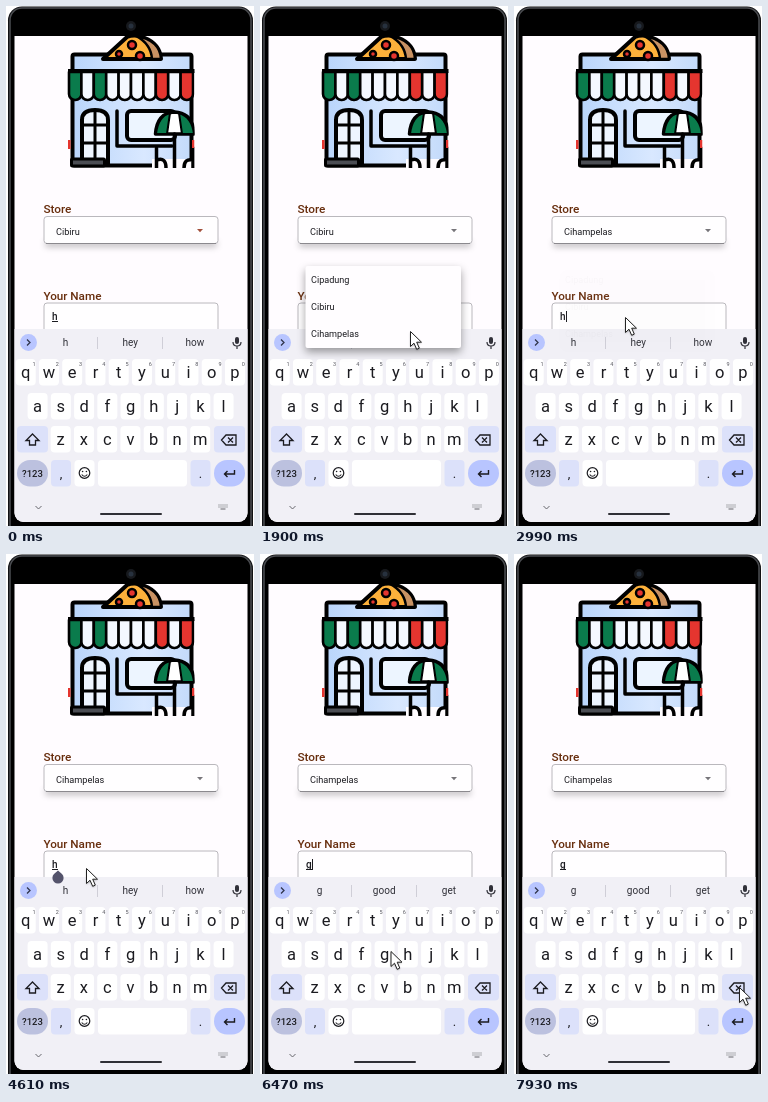
Animation of 248 by 520 pixels, one loop 8000 ms. Source, as an HTML page with a canvas:

```html
<!DOCTYPE html>
<html lang="en">
<head>
<meta charset="utf-8">
<title>Order form</title>
<style>
html, body { margin: 0; width: 100%; height: 100%; overflow: hidden; background: #fff; }
canvas { display: block; width: 248px; height: 520px; }
</style>
</head>
<body>
<canvas id="stage"></canvas>
<script>
const W = 248, H = 520, LOOP = 8000;
const canvas = document.getElementById('stage');
const dpr = window.devicePixelRatio || 1;
canvas.width = W * dpr;
canvas.height = H * dpr;
const c = canvas.getContext('2d');
const INK = '#1b1b20', PAPER = '#fffcff', BROWN = '#682e0e', EDGE = '#bab8bd';
const GREEN = '#0a7b4c', RED = '#e5352f';

// pointer: time, x, y
const path = [
  [200, 219, 520], [420, 211, 405], [700, 192, 227], [890, 189, 235], [1430, 189, 235],
  [1900, 150, 325], [2200, 146, 334], [2710, 141, 328], [2990, 111, 311], [3500, 80, 314],
  [5200, 80, 314], [5600, 127, 424], [5980, 121, 403], [6250, 121, 403], [6470, 130.5, 397],
  [6890, 137, 397], [7180, 157, 397], [7370, 157, 397], [7860, 225, 433]
];
const caretOn = [
  [350, 850], [2740, 3280], [3600, 3800], [4110, 4610], [4820, 5320],
  [5820, 6600], [7100, 7600]
];

const within = (t, a, b) => t >= a && t < b;
const clamp = v => Math.max(0, Math.min(1, v));
const seg = (t, a, b) => { const p = clamp((t - a) / (b - a)); return p * p * (3 - 2 * p); };
const mix = (a, b, p) => a + (b - a) * p;

function box(x, y, w, h, r, fill, stroke, lw = 1) {
  c.beginPath();
  c.roundRect(x, y, w, h, r);
  if (fill) { c.fillStyle = fill; c.fill(); }
  if (stroke) { c.strokeStyle = stroke; c.lineWidth = lw; c.stroke(); }
}

function disc(x, y, r, fill, stroke, lw = 1) {
  c.beginPath();
  c.arc(x, y, r, 0, 7);
  if (fill) { c.fillStyle = fill; c.fill(); }
  if (stroke) { c.strokeStyle = stroke; c.lineWidth = lw; c.stroke(); }
}

function shape(d, fill, stroke, lw = 1) {
  const p = new Path2D(d);
  if (fill) { c.fillStyle = fill; c.fill(p); }
  if (stroke) { c.strokeStyle = stroke; c.lineWidth = lw; c.stroke(p); }
}

function text(s, x, y, size, color = INK, align = 'left', weight = 400) {
  c.font = `${weight} ${size}px Roboto, sans-serif`;
  c.textAlign = align;
  c.fillStyle = color;
  c.fillText(s, x, y);
}

function shadowed(blur, dy, color, draw) {
  c.save();
  c.shadowColor = color;
  c.shadowBlur = blur * dpr;
  c.shadowOffsetY = dy * dpr;
  draw();
  c.restore();
}

function phone() {
  c.fillStyle = '#fff';
  c.fillRect(0, 0, W, H);
  box(2, .5, 245, 560, 14, '#111214');
  box(4, 2, 241, 560, 12, '#000', '#4b4d51', 1.5);
  box(8.5, 30, 233, 486, [0, 0, 9, 9], PAPER);
  disc(125, 20, 5, '#17191d');
  disc(125, 20, 2.5, '#27313e');
}

function shop() {
  c.save();
  c.beginPath();
  c.rect(61, 30, 127.5, 132);
  c.clip();
  c.lineJoin = c.lineCap = 'round';
  const wall = c.createLinearGradient(66, 0, 186, 0);
  wall.addColorStop(0, '#b9d5fb');
  wall.addColorStop(.6, '#d9e8ff');
  wall.addColorStop(1, '#c3dafa');
  box(66.5, 48.5, 119, 111, 2, wall, '#000', 4);

  // pizza slice
  shape('M97 53L121 31Q128 28 136 31Q154 37 155 53Z', '#fdb13b', '#000', 4);
  shape('M130 30Q154 34 155 53H146Q145 38 130 30Z', '#c99263', '#000', 2.5);
  disc(126, 39, 4, RED, '#000', 2.5);
  disc(113, 48, 3, RED, '#000', 2.5);
  disc(134, 50, 4, RED, '#000', 2.5);

  // awning
  for (let i = 0; i < 10; i++) {
    const hue = i % 2 && i !== 7 ? '#f4f8ff' : i < 3 ? GREEN : i > 6 ? RED : '#f4f8ff';
    const fill = i === 8 ? '#f4f8ff' : i === 9 ? RED : hue;
    box(63 + i * 12.4, 66, 12.4, 28, [0, 0, 6, 6], fill, '#000', 2.6);
  }
  c.fillStyle = '#000';
  c.fillRect(62, 63, 127, 4);

  // door and window
  shape('M76 158V114Q76 104 89 104Q102 104 102 114V158Z', '#eef5ff', '#000', 4);
  shape('M89 104V157M77 119H101M77 137H101', null, '#000', 3);
  box(121, 105, 48, 29, 4, '#edf5ff', '#000', 4);
  shape('M111 105V140H166', null, '#000', 3.5);

  // parasol and chairs
  shape('M149.5 128Q151 107 168.5 106Q187 107 188 128Z', '#fff', '#000', 3.5);
  shape('M150 128Q152 110 164 107L161 128Z', GREEN, '#000', 2);
  shape('M173 107Q186 111 188 128H176Z', GREEN, '#000', 2);
  c.fillStyle = PAPER;
  c.fillRect(146, 153, 43, 10);
  shape('M168.5 128V162M150.5 142V162M151 154Q160 151 160 162M187 142V162M178 162Q178 152 187 154', null, '#000', 3.5);
  c.fillStyle = RED;
  c.fillRect(62, 134, 2.5, 9);
  c.fillRect(186, 134, 2.5, 8);
  box(65.5, 153, 33, 7, 1, '#4b4d53', '#000', 3);
  c.restore();
}

function form(t) {
  text('Store', 37.4, 207.2, 11.8, BROWN, 'left', 500);
  shadowed(6, 4, 'rgba(0,0,0,.25)', () => box(39, 231, 172, 6, 2, '#fff'));
  box(38, 210.5, 174, 27, 3, '#fffeff', EDGE);
  shape('M40 237.5H210', null, '#8b898e');
  text(t < 2640 ? 'Cibiru' : 'Cihampelas', 50, 228.5, 9.2);
  shape('M191 223H197L194 226.2Z', t < 1120 ? '#a2503b' : '#77757a');

  text('Your Name', 37.4, 293.7, 11.7, BROWN, 'left', 500);
  box(38, 297, 174, 31, 3, '#fffeff', EDGE);
  const word = t < 4820 ? 'h' : t < 6120 ? '' : 'g';
  text(word, 46, 314, 10, INK, 'left', 500);
  if (word && !within(t, 2740, 3600)) {
    c.fillStyle = INK;
    c.fillRect(46, 315, 6, 1);
  }
  if (caretOn.some(([a, b]) => within(t, a, b))) {
    c.fillStyle = INK;
    c.fillRect(word ? 52 : 46, 305, 1, 11);
  }
}

const key = (x, y, w, fill = '#fff', r = 4) => box(x, y, w, 26.5, r, fill);

function letters(s, x, y) {
  [...s].forEach((ch, i) => {
    const cx = x + i * 23.25;
    key(cx - 10, y, 20);
    text(ch, cx, y + 19, 16.5, INK, 'center');
  });
}

function suggestions(t) {
  const words = t < 4880 ? ['h', 'hey', 'how'] : t < 6190 ? [] : ['g', 'good', 'get'];
  disc(22.5, 336.5, 8.5, '#b8c5ff');
  shape(words.length ? 'M21 333.5L24 336.5L21 339.5' : 'M24 333.5L21 336.5L24 339.5', null, '#30364d', 1.3);
  words.forEach((w, i) => text(w, 59.5 + i * 64.7, 340, 10, '#303038', 'center'));
  if (words.length) {
    c.fillStyle = '#cfced7';
    c.fillRect(91, 331, 1, 12);
    c.fillRect(156, 331, 1, 12);
  }
  box(229, 331, 4, 7, 2, '#303038');
  shape('M227 336Q227 340 231 340Q235 340 235 336M231 340V343', null, '#303038', 1.2);
}

function keyboard(t) {
  box(8.5, 323, 233, 193, [0, 0, 9, 9], '#f1f0f6');
  suggestions(t);
  letters('qwertyuiop', 19.7, 353);
  [...'1234567890'].forEach((n, i) => text(n, 28 + i * 23.25, 360, 5.5, '#55555e', 'center'));
  letters('asdfghjkl', 31.6, 387);
  letters('zxcvbnm', 54.7, 420);

  const pale = '#dce1fa';
  key(11, 420, 31, pale);
  shape('M26.5 428L33 434.5H29.5V439H23.5V434.5H20Z', null, INK, 1.3);
  key(208, 420, 31, pale);
  shape('M220 429H230V439H220L215.5 434ZM222 431.5L227 436.5M227 431.5L222 436.5', null, INK, 1.3);

  key(11, 454, 31, '#bcc1df', 13);
  text('?123', 26.5, 471, 9.5, INK, 'center', 500);
  key(45, 454, 20, pale);
  text(',', 55, 472, 13, INK, 'center');
  key(68.5, 454, 20);
  disc(78.5, 467, 5.3, null, INK, 1.2);
  disc(76.6, 465.5, .8, INK);
  disc(80.4, 465.5, .8, INK);
  shape('M75.7 468.5Q78.5 472 81.3 468.5', null, INK, 1.1);
  key(92, 454, 89);
  key(184.5, 454, 20, pale);
  text('.', 194.5, 472, 13, INK, 'center');
  key(208, 454, 31, '#b8c5ff', 13);
  shape('M228.5 464V468H218.5M221.5 465L218.5 468L221.5 471', null, INK, 1.4);

  shape('M29.5 500L32.5 503L35.5 500', null, '#67676d', 1);
  c.fillStyle = '#67676d';
  for (let i = 0; i < 10; i++) c.fillRect(212.5 + i % 5 * 2, 498.5 + (i / 5 | 0) * 2, 1, 1);
  c.fillRect(214.5, 502.5, 5, 1);
  box(94, 507, 62, 2, 1, '#303036');
}

function menu(t) {
  const alpha = seg(t, 1110, 1320) * (1 - seg(t, 2750, 3015));
  if (!alpha) return;
  const p = seg(t, 1360, 1500), rise = 1 - seg(t, 1110, 1350);
  const top = mix(250, 260, p) - rise * 10;
  const bottom = mix(323, 342, p) - rise * 20;
  c.save();
  c.globalAlpha = alpha;
  shadowed(9, 4, 'rgba(0,0,0,.38)', () => box(45.5, top, 155.5, bottom - top, 2, '#fffdff'));
  c.beginPath();
  c.rect(45, top, 156, bottom - top);
  c.clip();
  ['Cipadung', 'Cibiru', 'Cihampelas'].forEach((s, i) =>
    text(s, 51, mix(263, 277, p) - rise * 10 + i * 27.2, 9.1));
  c.restore();
}

function handle(t) {
  if (within(t, 4100, 4820)) shape('M52 316.5L56 320A5.6 5.6 0 1 1 48 320Z', '#54536b');
}

function pointer(t) {
  if (t < 200) return;
  let i = path.findIndex(k => k[0] > t);
  if (i < 0) i = path.length - 1;
  const a = path[i - 1], b = path[i], p = seg(t, a[0], b[0]);
  const arrow = 'M.5 .5V15.5L4 12.2L6.7 18.3L9.3 17.1L6.7 11.2H11.5Z';
  c.save();
  c.translate(mix(a[1], b[1], p), mix(a[2], b[2], p));
  c.lineJoin = 'round';
  shadowed(2, 1, 'rgba(0,0,0,.35)', () => shape(arrow, '#fff'));
  shape(arrow, null, '#222');
  c.restore();
}

function draw(now) {
  const t = now % LOOP;
  c.setTransform(dpr, 0, 0, dpr, 0, 0);
  phone();
  shop();
  form(t);
  keyboard(t);
  menu(t);
  handle(t);
  pointer(t);
  requestAnimationFrame(draw);
}
requestAnimationFrame(draw);
</script>
</body>
</html>
```
